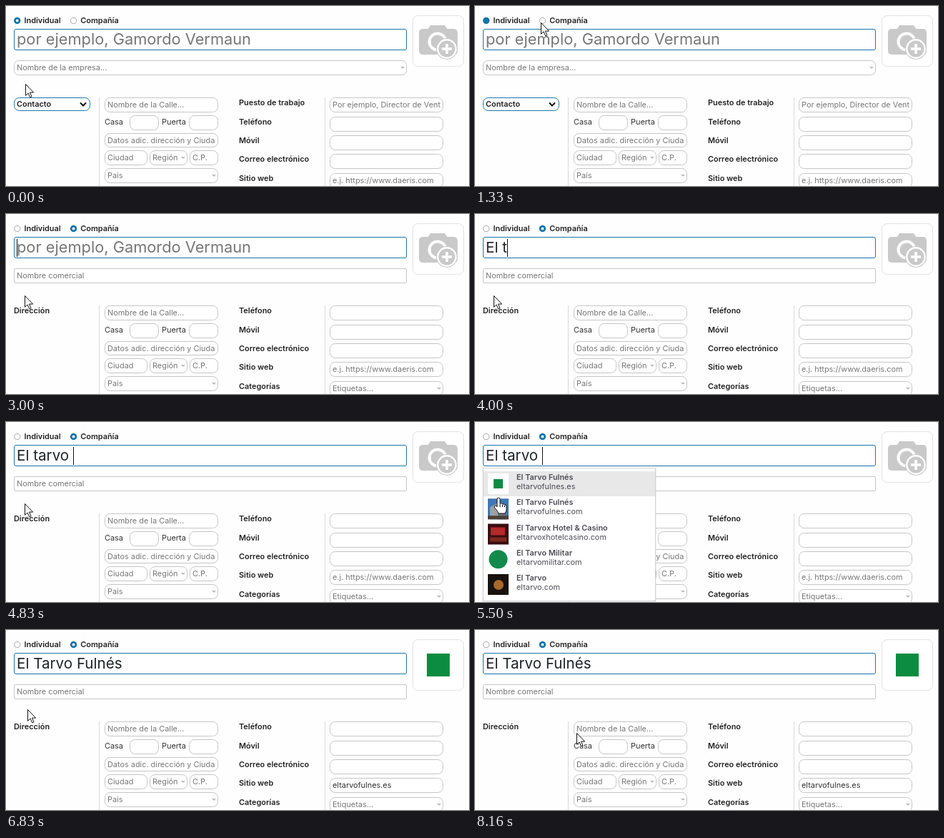
Animation of 648x252 px, one loop 8.33 s. Source, as an HTML page:

```html
<!DOCTYPE html>
<html lang="es">
<head>
<meta charset="utf-8">
<title>Formulario de contacto</title>
<style>
html, body { margin: 0; width: 100%; height: 100%; overflow: hidden; background: #fefefe; }
svg { display: block; }
text { font: 400 10.9px Inter, "Open Sans", sans-serif; fill: #333; white-space: pre; }
.bold { font-weight: 600; fill: #222; }
.hint { fill: #777; }
.big { font-size: 20.6px; fill: #212529; }
.big.hint { font-size: 21.8px; fill: #777; }
.box { fill: #fff; stroke: #c6c6c6; }
.focus { stroke: #1878a8; }
.frame { stroke: #e2e2e4; }
.item { fill: #4d4d55; }
</style>
</head>
<body>
<svg id="stage" width="648" height="252" viewBox="0 0 648 252"></svg>
<script>
const LOOP = 8330, TICK = 166.6, BLUE = '#1173a8', GREEN = '#0b8c40';
const COMPANY = 'El Tarvo Fulnés', SITE = 'eltarvofulnes.es', TYPED = 'El tarvo ';
const stage = document.getElementById('stage');

const text = (x, y, s, cls = '') => `<text x="${x}" y="${y}" class="${cls}">${s}</text>`;
const rect = (x, y, w, h, fill) => `<rect x="${x}" y="${y}" width="${w}" height="${h}" fill="${fill}"/>`;
const circle = (x, y, r, attrs) => `<circle cx="${x}" cy="${y}" r="${r}" ${attrs}/>`;
const box = (x, y, w, h, r, cls = '') =>
  `<rect x="${x + .5}" y="${y + .5}" width="${w - 1}" height="${h - 1}" rx="${r}" class="box ${cls}"/>`;
const arrow = (x, y) => `<path d="M${x - 3} ${y - 1.5}h6l-3 3z" fill="#bdbdbd"/>`;

// Input with its text cut off at the inner edge
function field(x, y, w, label = '', { h = 21, r = 7, cls = 'hint', menu = false } = {}) {
  return box(x, y, w, h, r) +
    `<svg x="${x}" y="${y}" width="${w - 4}" height="${h}">${text(4, h / 2 + 3.5, label, cls)}</svg>` +
    (menu ? arrow(x + w - 6, y + h / 2) : '');
}

function radio(x, label, state) {
  const ring = state === 'off'
    ? circle(x, 20.5, 4.2, 'fill="#fff" stroke="#a8a8a8"')
    : circle(x, 20.5, 4.7, `fill="${BLUE}"`);
  const dot = state === 'on' ? circle(x, 20.5, 1.9, 'fill="#fff"') : '';
  return ring + dot + text(x + 9.8, 24.2, label, 'bold');
}

function camera() {
  return `<g fill="#c9c9c9"><rect x="578" y="32" width="54" height="36" rx="5"/>
    <path d="M590 33l4-6h20l4 6z"/></g>` +
    circle(604, 50, 11.5, 'fill="none" stroke="#fff" stroke-width="4"') +
    circle(617, 60, 15, 'fill="#c9c9c9"') +
    circle(617, 60, 12.7, 'fill="#c9c9c9" stroke="#fff" stroke-width="2.4"') +
    '<path d="M617 53v14M610 60h14" stroke="#fff" stroke-width="3.6"/>';
}

function picture(filled) {
  return box(569, 13, 72, 72, 7, 'frame') + (filled ? rect(589, 33, 32, 32, GREEN) : camera());
}

function address() {
  return field(138, 128, 159, 'Nombre de la Calle...') +
    text(138, 166, 'Casa') + field(173, 153, 41) +
    text(218, 166, 'Puerta') + field(256, 153, 41) +
    field(138, 178, 159, 'Datos adic. dirección y Ciudad', { h: 20 }) +
    field(138, 202, 60, 'Ciudad') +
    field(201, 202, 53, 'Región', { menu: true }) +
    field(257, 202, 40, 'C.P.') +
    field(138, 227, 159, 'País', { menu: true });
}

function details(isCompany, filled) {
  const rows = [['Teléfono'], ['Móvil'], ['Correo electrónico'],
    ['Sitio web', filled ? SITE : 'e.j. https://www.daeris.com', { cls: filled ? '' : 'hint' }]];
  if (isCompany) rows.push(['Categorías', 'Etiquetas...', { menu: true }]);
  else rows.unshift(['Puesto de trabajo', 'Por ejemplo, Director de Ventas']);
  return rows.map(([label, value, opts], i) => {
    const y = Math.round(128.4 + i * 26.3);
    return text(326, y + 11.3, label, 'bold') + field(453, y, 159, value, opts);
  }).join('');
}

function suggestions() {
  const thumbs = [
    rect(0, 0, 29, 29, '#fff') + rect(8, 8, 13, 13, GREEN),
    rect(0, 0, 29, 29, '#3f77b5') + '<path d="M3 29V12l11-6 12 5v18z" fill="#9aa0a4"/>' +
      '<path d="M14 6l12 5v18H14z" fill="#66717d"/>' + rect(0, 24, 29, 5, '#4a4138'),
    rect(0, 0, 29, 29, '#3a0d10') + rect(4, 5, 20, 11, '#b5282b') + rect(3, 19, 23, 6, '#7c2a20'),
    rect(0, 0, 29, 29, '#fff') + circle(14.5, 14.5, 13, 'fill="#138a4c"'),
    rect(0, 0, 29, 29, '#17120e') + circle(15, 15, 7, 'fill="#a8692a"')
  ];
  const items = [[COMPANY, SITE], [COMPANY, 'eltarvofulnes.com'],
    ['El Tarvox Hotel &amp; Casino', 'eltarvoxhotelcasino.com'],
    ['El Tarvo Militar', 'eltarvomilitar.com'], ['El Tarvo', 'eltarvo.com']];
  return rect(10, 65, 244, 188, 'rgba(0,0,0,.05)') +
    '<rect x="11.5" y="64.5" width="241" height="186" fill="#fff" stroke="#d2d2d2"/>' +
    rect(12, 69, 240, 35, '#e9e8e8') +
    items.map(([name, site], i) => `<g transform="translate(0 ${i * 35.25})">
      <g transform="translate(18 72)">${thumbs[i]}</g>
      ${text(58, 81, name, 'bold item')}${text(58, 94, site, 'item')}</g>`).join('');
}

const pointers = {
  arrow: '<path d="M.5.5V16.3L4.1 13 6.7 18.8 9 17.8 6.5 12.1H11.6Z" fill="#fff" stroke="#111"/>',
  beam: '<path d="M-3-8q3 0 3 2v12q0 2-3 2M3-8q-3 0-3 2v12q0 2 3 2" fill="none" stroke="#222"/>',
  hand: `<path d="M-2 2Q-2 0 0 0T2 2V8.5Q4.8 6.8 5.5 9.2Q8 7.8 8.5 10.2Q11 9.2 11 12V16Q11 19 9 22H0
    Q-1 19-5 14.5Q-7 11-4.5 11Q-3 11-2 13Z" fill="#fff" stroke="#111" stroke-linejoin="round"/>
    <path d="M2 9v4M5.5 10v3M8.5 11v2" stroke="#111"/>`
};

// Pointer stops: tick, x, y; eased in between
const stops = [
  [1, 27, 109], [5, 92, 23], [9, 92, 23], [13, 20, 47], [14, 20, 47], [18, 26, 114],
  [31, 26, 114], [36, 47, 92], [38, 29, 111], [40, 29, 111], [41, 30, 111], [48, 30, 111],
  [49, 142, 144]
];

function pointer(tick, listOpen) {
  const i = stops.findIndex(s => s[0] >= tick);
  const b = stops[i], a = stops[Math.max(0, i - 1)];
  const p = b === a ? 1 : (tick - a[0]) / (b[0] - a[0]);
  const e = p * p * (3 - 2 * p);
  const x = Math.round(a[1] + (b[1] - a[1]) * e), y = Math.round(a[2] + (b[2] - a[2]) * e);
  const inName = y > 32 && y < 62 && tick > 9;
  const shape = listOpen ? 'hand' : inName ? 'beam' : 'arrow';
  return `<g transform="translate(${x} ${y})">${pointers[shape]}</g>`;
}

function typedLength(tick) {
  if (tick < 21) return 0;
  if (tick < 24) return Math.min(2, tick - 20);
  return Math.min(TYPED.length, tick - 20);
}

function render(tick) {
  const isCompany = tick >= 9, pressing = tick >= 7 && !isCompany;
  const listOpen = tick >= 32 && tick < 37, chosen = tick >= 37, filled = tick >= 38;
  const name = chosen ? COMPANY : TYPED.slice(0, typedLength(tick));
  const caret = tick >= 14 && !chosen;

  stage.innerHTML = rect(0, 0, 648, 252, '#fefefe') +
    radio(15.7, 'Individual', isCompany ? 'off' : pressing ? 'solid' : 'on') +
    radio(94.5, 'Compañía', isCompany ? 'on' : 'off') +
    box(11, 32, 550, 30, 2.5, 'focus') +
    `<text id="name" x="15" y="54.3" class="big ${name ? '' : 'hint'}">${name || 'por ejemplo, Gamordo Vermaun'}</text>` +
    (isCompany
      ? field(11, 76, 550, 'Nombre comercial', { r: 1.5 }) + text(11, 139.3, 'Dirección', 'bold')
      : field(11, 76, 550, 'Nombre de la empresa...', { r: 6, menu: true }) +
        box(11, 128, 107, 19, 7, 'focus') + text(15, 141.3, 'Contacto', 'bold') +
        '<path d="M104 135.5l4 4 4-4" fill="none" stroke="#111" stroke-width="2"/>') +
    rect(130, 128, 1, 124, '#dcdcdc') + rect(446, 128, 1, 124, '#dcdcdc') +
    picture(filled) + address() + details(isCompany, filled) +
    (listOpen ? suggestions() : '') +
    '<g id="overlay"></g>';

  const width = name ? document.getElementById('name').getComputedTextLength() : 0;
  document.getElementById('overlay').innerHTML =
    (caret ? rect(Math.round(15 + width), 35, 1, 25, '#111') : '') + pointer(tick, listOpen);
}

let shown = -1;
function frame() {
  const tick = Math.min(49, Math.floor((performance.now() % LOOP + 8) / TICK));
  if (tick !== shown) render(shown = tick);
  requestAnimationFrame(frame);
}
frame();
</script>
</body>
</html>
```
